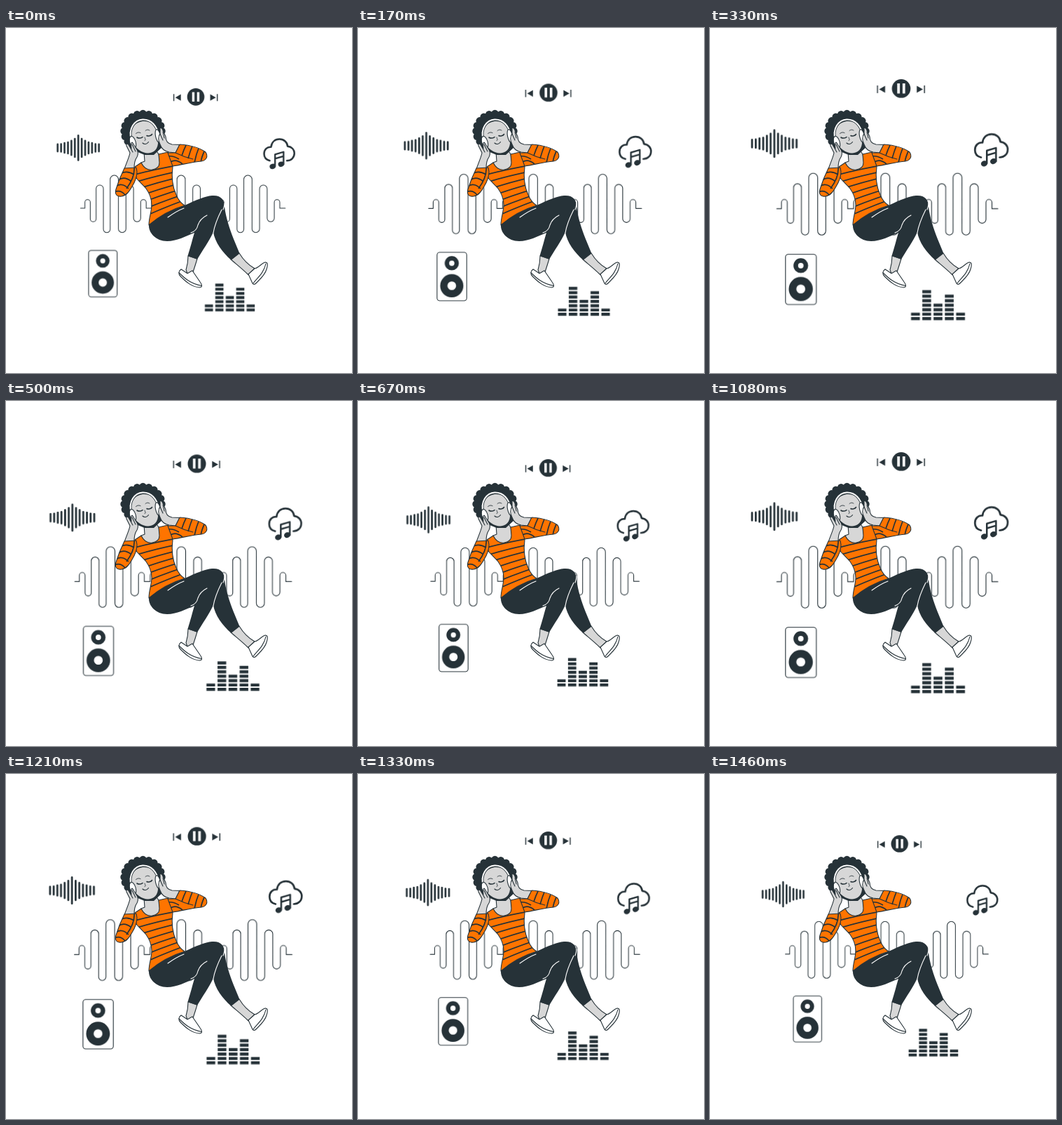
An HTML page that plays this animation: 494 by 492 pixels, repeating every 1.5 s.

```html
<!DOCTYPE html>
<html lang="en">
<head>
<meta charset="utf-8">
<title>Listening to music</title>
<style>
html, body { margin: 0; width: 100%; height: 100%; overflow: hidden; background: #fff; }
svg { display: block; width: 100%; height: 100%; }
.dark { fill: #263238; }
.skin { fill: #d7d7d7; }
.white { fill: #fff; }
.top { fill: #ff7400; }
.line { stroke: #263238; stroke-width: 1.1; stroke-linejoin: round; stroke-linecap: round; }
.none { fill: none; }
.stripe { fill: none; stroke: #263238; stroke-width: 1.7; }

/* Two beats per loop, stepped at 24 pictures per second. */
#beat { transform-origin: 245px 247px; animation: beat 1.5s -4ms infinite; }
@keyframes beat {
  0% { transform: scale(.926); animation-timing-function: steps(8); }
  22.222% { transform: scale(1); animation-timing-function: steps(1); }
  25% { transform: scale(1.009); animation-timing-function: steps(7); }
  44.444% { transform: scale(.943); animation-timing-function: steps(3); }
  52.778% { transform: scale(.916); animation-timing-function: steps(3); }
  61.111% { transform: scale(.948); animation-timing-function: steps(4); }
  72.222% { transform: scale(1); animation-timing-function: steps(1); }
  75% { transform: scale(1.009); animation-timing-function: steps(5); }
  88.889% { transform: scale(.948); animation-timing-function: steps(3); }
  97.222% { transform: scale(.918); animation-timing-function: steps(1); }
  100% { transform: scale(.926); }
}
</style>
</head>
<body>
<svg viewBox="0 0 494 492">
  <defs>
    <path id="torsoShape" d="M193 192C197 200 203 203 209 202C215 201 219 198 219 192L218 180L231 177C235 184 238 191 238 198C236 213 238 227 243 238C246 245 250 250 255 253C238 258 219 268 204 281C204 270 208 262 208 252C208 242 205 236 200 229C195 223 190 219 186 214L184 198Z"/>
    <path id="leftSleeve" d="M169 200L186 199L187 205C187 211 185 218 180 226C176 233 172 239 165 240C158 241 155 237 157 230C160 220 164 210 169 200Z"/>
    <path id="rightSleeve" d="M248 166C262 167 277 171 285 177C289 183 286 189 279 190C265 191 252 195 238 197L231 178L242 178Z"/>
    <clipPath id="torsoClip"><use href="#torsoShape"/></clipPath>
    <clipPath id="leftClip"><use href="#leftSleeve"/></clipPath>
    <clipPath id="rightClip"><use href="#rightSleeve"/></clipPath>
  </defs>

  <g id="beat">
    <path id="pulse" class="line none"/>
    <path id="bars" class="line none" style="stroke-width:2.8"/>

    <g class="dark">
      <circle cx="273" cy="86.3" r="13.3"/>
      <path d="M238.3 82h1.5v10.8h-1.5zM250 82.3v10L241.4 87.4zM295.2 82.3v10L304 87.4zM305.4 82h1.5v10.8h-1.5z"/>
      <path class="white" d="M267.3 79h3.7v14.4h-3.7zM274.9 79h3.7v14.4h-3.7z"/>
    </g>

    <path class="line none" style="stroke-width:2.7" d="M387 184.5C381 183 378.3 179 378.3 174C378.3 167 383 163 389 163.4C390 156 395 151.4 402 151.4C409 151.4 414 156 414.6 162.4C421 163 425 167.5 425 173C425 180 420 184.5 413.5 184.5"/>
    <path class="line none" style="stroke-width:2.5" d="M395.2 193V174.8L408.3 171V190M395.2 181.5L408.3 177.7"/>
    <g class="dark">
      <ellipse cx="391.5" cy="193.3" rx="4.7" ry="4" transform="rotate(-20 391.5 193.3)"/>
      <ellipse cx="404.6" cy="190" rx="4.7" ry="4" transform="rotate(-20 404.6 190)"/>
    </g>

    <rect class="line white" x="107.8" y="322.7" width="44" height="71.7" rx="4"/>
    <g class="none" stroke="#263238">
      <circle cx="129.6" cy="338.8" r="7.2" stroke-width="6.6"/>
      <circle cx="129.6" cy="372.2" r="11.8" stroke-width="10.8"/>
    </g>
    <path id="levels" class="dark"/>
  </g>

  <g id="woman">
    <!-- legs -->
    <path class="line skin" d="M260 325L273 329C271 336 269 342 267 348L259 350L257 345C259 338 260 332 260 325Z"/>
    <path class="line skin" d="M321 330L333 321C339 331 346 338 355 343L346 352C338 344 329 337 321 330Z"/>
    <path class="line white" d="M250 344C246 347 246 351 249 354C257 362 265 369 276 370C281 370 280 366 277 362L266 346L259 350Z"/>
    <path class="line none" d="M247 349C255 357 264 365 279 367.5"/>
    <path class="line white" d="M346 351L355 343C361 342 364 336 370 334C374 334 374 338 372 344C370 352 363 358 357 364C354 367 352 365 351 362Z"/>
    <path class="line none" d="M353 364C358 357 368 350 371 336"/>
    <path class="dark" d="M204 280C218 268 236 259 255 253C272 245 284 240 294 239C306 238 312 244 312 255C314 270 319 286 325 301L333.5 321.5L321.5 331C309 320 298 305 296 291C290 304 280 318 273 330L259.5 325C263 314 266 302 269 292C256 297 244 304 230 304C214 304 203 292 204 280Z"/>
    <g class="none" stroke="#fff" stroke-width="1.1" stroke-linecap="round">
      <path d="M231 270C238 265 246 260 254 257"/>
      <path d="M264 292C270 290 273 286 274 281C276 275 281 270 287 267"/>
      <path d="M308 259C303 269 298 280 296 292M312 250C312 253 311 256 310 259"/>
    </g>

    <!-- neck and top -->
    <path class="line skin" d="M197 177L198 190L193 192C196 202 205 208 213 204C218 202 220 198 220 192L218 180L214 174Z"/>
    <use href="#torsoShape" class="top"/>
    <path id="torsoStripes" class="stripe" clip-path="url(#torsoClip)"/>
    <use href="#torsoShape" class="line none"/>

    <!-- head -->
    <g id="hair" class="dark"><ellipse cx="195.5" cy="147" rx="28" ry="25"/></g>
    <path class="dark" d="M170 157L181 174L198 181L211 181L224 169L226 148Z"/>
    <path class="skin" d="M178 156C177 142 186 133 197 133C208 133 214 140 216 151C218 162 218 171 211 176C205 180 197 179 190 174C183 169 179 163 178 156Z"/>
    <path class="line none" style="stroke-width:3.6" d="M179 160C174 143 184 131 195 130.5C207 130 216 139 218 154"/>
    <path class="none" stroke="#fff" stroke-width="2" d="M179 160C174 143 184 131 195 130.5C207 130 216 139 218 154"/>
    <g class="line none">
      <path style="stroke-width:1.6" d="M187 156C189 157.5 193 157.5 195 155.5M201 153.5C203 154.5 207 154 208.500 151.5"/>
      <path style="stroke-width:.9" d="M185.500 150.500C187.500 148.500 190 148.500 192 149.500M199 146.500C201 144.500 203.500 145 205 146M198 156C199 159 200 160 198 160.500"/>
      <path d="M195 164C197.500 166.500 201 166 203.500 162.500"/>
    </g>
    <ellipse class="line white" cx="181" cy="163" rx="4.2" ry="9" transform="rotate(-16 181 163)"/>
    <ellipse class="line white" cx="217" cy="154" rx="3.5" ry="9.5" transform="rotate(-12 217 154)"/>

    <!-- left arm -->
    <path class="line skin" d="M172 168C171 164 174 164 176 168L179 172C178 166 179 161 181 164L186 172C189 176 189 180 187 184C184 188 183 194 183 200L169 201C172 192 176 184 177 178Z"/>
    <path class="line none" d="M176 168L181 177M180 166L185 176"/>
    <use href="#leftSleeve" class="top"/>
    <path class="stripe" clip-path="url(#leftClip)" d="M164 207C171 204 177 205 183 209M160 217C167 212 173 214 179 219M156 226C163 221 169 223 175 229M154 234C161 231 166 233 170 238M183 198C184 210 179 220 172 229"/>
    <use href="#leftSleeve" class="line none"/>

    <!-- right arm -->
    <path class="line skin" d="M220 145C219 141 223 142 224 146L228 155C228 162 231 165 237 166L248 166.5L242 178L233 177C227 176 222 172 220 166C217 160 217 154 220 151Z"/>
    <path class="line none" d="M220 151L224 160M224 148L226 157"/>
    <use href="#rightSleeve" class="top"/>
    <path class="stripe" clip-path="url(#rightClip)" d="M258 165C255 171 253 176 251 182M267 166C264 173 262 179 260 186M276 169C273 176 271 182 269 192M284 174C281 180 279 185 278 192M232 183C237 182 242 184 247 187M235 191C240 188 246 189 252 194"/>
    <path class="line none" d="M242 178C250 182 258 185 267 187"/>
    <use href="#rightSleeve" class="line none"/>
  </g>
</svg>
<script>
const byId = id => document.getElementById(id);
const draw = (id, d) => byId(id).setAttribute('d', d);
const range = n => [...Array(n).keys()];

// Three repeats of a rounded pulse, joined along the base line.
const base = 257.7, repeat = 103;
const sides = [102, 110.3, 119.3, 130.5, 141, 153.7, 165.3, 177, 188, 196.5];
const turns = [244.5, 278.5, 222, 295.2, 207, 295.2, 222, 278.5, 244.5];
let pulse = `M95.3 ${base}`;
for (let n = 0; n < 3; n++) {
  pulse += `H${sides[0] + n * repeat}`;
  turns.forEach((y, i) => {
    const r = (sides[i + 1] - sides[i]) / 2, up = i % 2 === 0;
    pulse += `V${up ? y + r : y - r}A${r} ${r} 0 0 ${up ? 1 : 0} ${sides[i + 1] + n * repeat} ${y + (up ? r : -r)}`;
  });
  pulse += `V${base}`;
}
draw('pulse', pulse + 'H411');

const reach = [19, 14, 11, 8.5, 7.5, 6, 5.5];
draw('bars', range(13).map(i => {
  const h = reach[Math.abs(i - 6)];
  return `M${60 + i * 5.3} ${164.8 - h}v${2 * h}`;
}).join(''));

draw('levels', [2, 7, 4, 6, 2].map((count, col) =>
  range(count).map(row => `M${287 + col * 16.1} ${412.3 - row * 6.4}h12.6v4.4h-12.6z`).join('')
).join(''));

draw('torsoStripes', range(7).map(i =>
  `M184 ${209 + 11 * i}Q${214 + i} ${201 + 9.5 * i} 256 ${194 + 8.5 * i}`
).join(''));

byId('hair').innerHTML += range(20).map(i => {
  const a = i * Math.PI / 10;
  return `<circle cx="${195.5 + 27 * Math.cos(a)}" cy="${147 + 25 * Math.sin(a)}" r="5.2"/>`;
}).join('');
</script>
</body>
</html>
```
